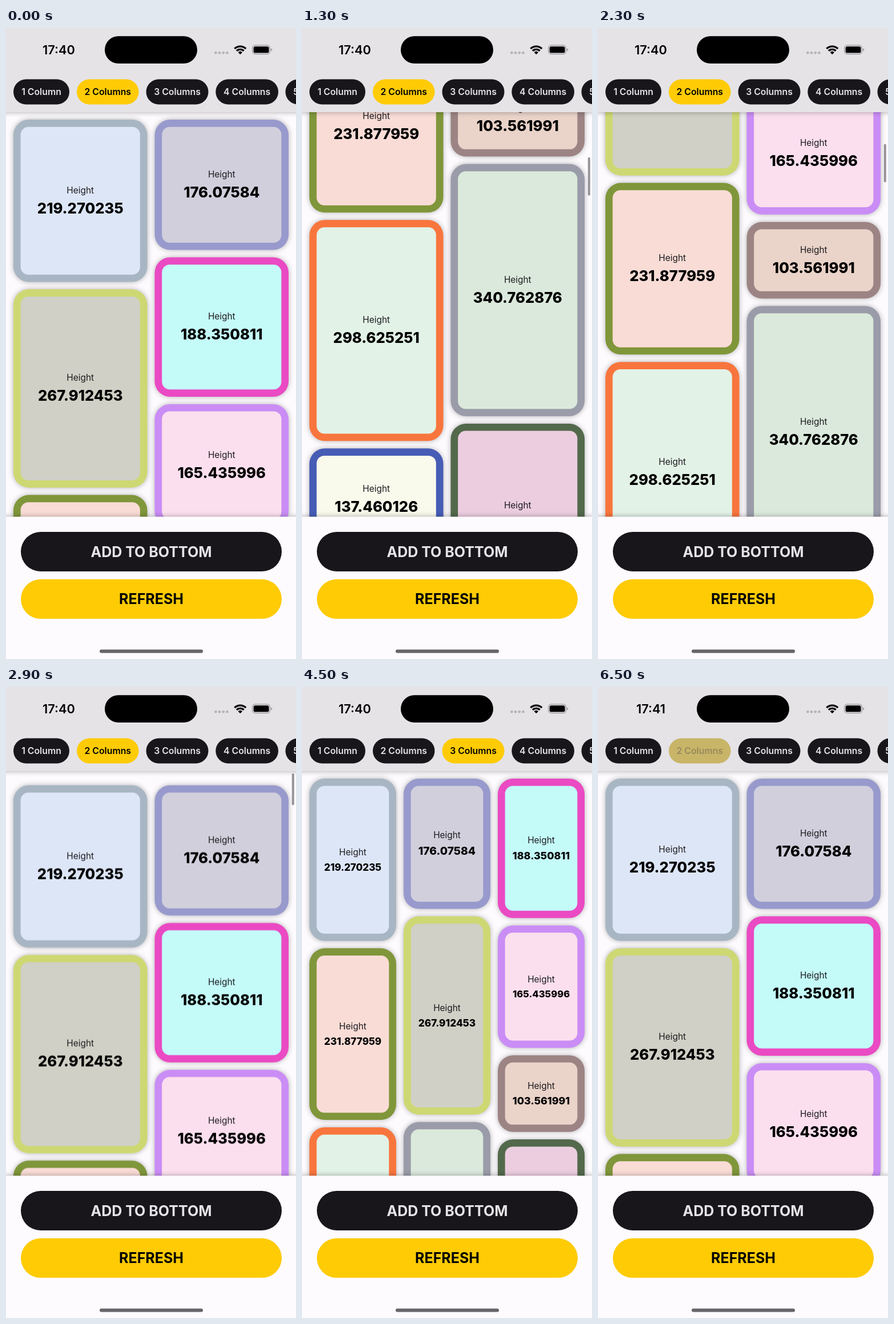
Animation of 508 by 1102 pixels, one loop 6600 ms. Source, as an HTML page:

```html
<!DOCTYPE html>
<html lang="en">
<head>
<meta charset="utf-8">
<title>Masonry grid</title>
<style>
  html, body { margin: 0; width: 100%; height: 100%; overflow: hidden; background: #fdfbfe; }
  svg { display: block; width: 100%; height: 100%; font-family: Inter, "Open Sans", sans-serif; }
  text { text-anchor: middle; }
  .label { font-size: 15.4px; fill: #1c1a1e; }
  .value { font-weight: 800; }
  .pill { font-size: 15.8px; font-weight: 600; }
  .action { font-size: 25px; font-weight: 700; }
  .clock { font-size: 21.8px; font-weight: 600; }
  #cards { filter: drop-shadow(0 0 5px rgba(0, 0, 0, .3)); }
  .bar { filter: drop-shadow(0 0 5px rgba(0, 0, 0, .33)); }
</style>
</head>
<body>
<svg id="stage" viewBox="0 0 508 1102">
  <rect width="508" height="1102" fill="#fdfbfe"/>
  <g id="cards"></g>
  <rect id="thumb" x="500.8" width="4" rx="2" fill="#97959a"/>

  <rect class="bar" x="-20" y="-20" width="548" height="167" fill="#e5e3e6"/>
  <text id="clock" class="clock" x="92.5" y="46"></text>
  <rect x="173" y="14.3" width="162" height="47.7" rx="23.8"/>
  <g fill="#b5b3b6">
    <circle cx="367.4" cy="43.3" r="2.4"/><circle cx="374" cy="43.3" r="2.4"/>
    <circle cx="380.7" cy="43.3" r="2.4"/><circle cx="387.4" cy="43.3" r="2.4"/>
  </g>
  <g fill="none" stroke="#000" stroke-width="3.2">
    <path d="M400.4 36.2A14 14 0 0 1 420.2 36.2"/>
    <path d="M404 40A8.8 8.8 0 0 1 416.6 40"/>
  </g>
  <path d="M410.3 46.2L406.6 42.4A5.2 5.2 0 0 1 414 42.4Z"/>
  <rect x="431.6" y="30.2" width="31" height="15.4" rx="5" fill="none" stroke="#98969a" stroke-width="1.2"/>
  <rect x="433.6" y="32.2" width="27" height="11.4" rx="3.2"/>
  <path d="M464.2 35.4Q466.4 36 466.4 37.9T464.2 40.4Z" fill="#98969a"/>
  <g id="pills"></g>

  <rect class="bar" x="-20" y="853.5" width="548" height="280" fill="#fdfbfe"/>
  <rect x="26" y="880" width="457" height="69" rx="34.5" fill="#18161a"/>
  <text class="action" x="254.5" y="923.6" fill="#e5e3e6">ADD TO BOTTOM</text>
  <rect x="26" y="962.8" width="457" height="69" rx="34.5" fill="#fecb05"/>
  <text class="action" x="254.5" y="1006.4">REFRESH</text>
  <rect x="164" y="1085.5" width="181" height="6" rx="3" fill="#67656a"/>
</svg>
<script>
const LOOP = 6600, STEP = 100;
const PT = 508 / 393, GAP = 10 * PT, TOP = 160, BORDER = 12.7;
const VALUE_SIZE = 25.6, LABEL_H = 18.5, TEXT_GAP = 6.7;
const DARK = [24, 22, 26], LIGHT = [229, 227, 230], YELLOW = [254, 203, 5], BLACK = [0, 0, 0];

// height, border, fill
const CARDS = [
  ['219.270235', '#a8b6c3', '#dde6f7'],
  ['176.07584', '#989acd', '#d1cfdc'],
  ['188.350811', '#ea4ac3', '#c4fbf9'],
  ['267.912453', '#ced873', '#d0d0c6'],
  ['165.435996', '#ca8df5', '#fcdfee'],
  ['231.877959', '#80963a', '#f9dcd6'],
  ['103.561991', '#9d8484', '#ead3c9'],
  ['340.762876', '#9a9ca9', '#dae9db'],
  ['298.625251', '#f8763d', '#e2f2e6'],
  ['249.396411', '#53694b', '#eccde0'],
  ['137.460126', '#465cb5', '#f9faec'],
  ['102.425657', '#4a6796', '#fccdcc'],
  ['109.703832', '#c99382', '#d5c5f1'],
  ['147.407637', '#6157be', '#cac9da'],
  ['206.318274', '#6634cb', '#c5c7c8'],
  ['182.604913', '#56c6dc', '#dfe8dc']
];

// left, width
const PILLS = [[13, 98], [124, 108.5], [245.5, 109], [367.3, 109.7], [489.5, 109]];

// press time, switch time, columns
const TAPS = [[3900, 4100, 3], [4700, 4800, 4], [5700, 5800, 1], [6400, 6500, 2]];

// time, offset, velocity per ms
const SCROLL = [
  [950, 0, 0], [1300, 793, 2], [1700, 1231, .5], [1850, 1262, 0],
  [2300, 545, -1.3], [2900, -11.6, 0], [3300, 0, 0]
];

const $ = id => document.getElementById(id);
const clamp = x => Math.min(1, Math.max(0, x));
const mix = (a, b, k) => `rgb(${a.map((v, i) => Math.round(v + (b[i] - v) * k))})`;

function set(el, attrs) {
  for (const key in attrs) el.setAttribute(key, attrs[key]);
  return el;
}

function add(parent, tag, attrs, text) {
  const el = document.createElementNS('http://www.w3.org/2000/svg', tag);
  if (text) el.textContent = text;
  return parent.appendChild(set(el, attrs));
}

const cards = CARDS.map(([height, border, fill]) => {
  const group = add($('cards'), 'g', {});
  const card = {
    group,
    h: height * PT,
    outer: add(group, 'rect', { rx: 27, fill: border }),
    inner: add(group, 'rect', { x: BORDER, y: BORDER, rx: 13.5, fill }),
    label: add(group, 'text', { class: 'label' }, 'Height'),
    value: add(group, 'text', { class: 'value', 'font-size': VALUE_SIZE }, height)
  };
  card.textWidth = card.value.getComputedTextLength();
  return card;
});

const pills = PILLS.map(([x, width], i) => {
  const group = add($('pills'), 'g', {});
  return {
    group,
    body: add(group, 'rect', { x, y: 89.5, width, height: 44, rx: 22 }),
    text: add(group, 'text', { class: 'pill', x: x + width / 2, y: 117.2 },
      `${i + 1} Column${i ? 's' : ''}`)
  };
});

// Each card goes to the shortest column; values shrink to fit.
function layout(cols) {
  const w = (508 - GAP * (cols + 1)) / cols;
  const ends = Array(cols).fill(TOP);
  for (const c of cards) {
    const col = ends.indexOf(Math.min(...ends));
    const size = VALUE_SIZE * Math.min(1, (w - 4 * GAP) / c.textWidth);
    const lineH = size * 1.2;
    const half = (LABEL_H + TEXT_GAP + lineH) / 2;
    const mid = c.h / 2;
    set(c.group, { transform: `translate(${GAP + col * (w + GAP)} ${ends[col]})` });
    set(c.outer, { width: w, height: c.h });
    set(c.inner, { width: w - 2 * BORDER, height: c.h - 2 * BORDER });
    set(c.label, { x: w / 2, y: mid - half + LABEL_H / 2 + 5.6 });
    set(c.value, { x: w / 2, y: mid + half - lineH / 2 + size * .364, 'font-size': size });
    ends[col] += c.h + GAP;
  }
}

function scrollAt(t) {
  const i = SCROLL.findIndex(key => key[0] > t);
  if (i < 1) return 0;
  const [t0, y0, v0] = SCROLL[i - 1], [t1, y1, v1] = SCROLL[i];
  const d = t1 - t0, u = (t - t0) / d, w = 1 - u;
  return y0 * (1 + 2 * u) * w * w + v0 * d * u * w * w
       + y1 * u * u * (3 - 2 * u) - v1 * d * u * u * w;
}

function drawPills(t, cols, since) {
  const tap = TAPS.find(([press, change]) => t >= press && t < change);
  const k = clamp((t - since) / 400);
  pills.forEach((p, i) => {
    const on = i + 1 === cols;
    set(p.body, { fill: on ? mix([200, 181, 104], YELLOW, k) : mix(DARK, DARK, 0) });
    set(p.text, { fill: on ? mix([151, 138, 92], BLACK, k) : mix(LIGHT, LIGHT, 0) });
    set(p.group, { opacity: tap && tap[2] === i + 1 ? .5 : 1 });
  });
}

let shownCols = 0;

function draw(t) {
  const last = TAPS.filter(tap => t >= tap[1]).pop();
  const cols = last ? last[2] : 2;
  if (cols !== shownCols) layout(shownCols = cols);

  const y = scrollAt(t);
  set($('cards'), { transform: `translate(0 ${-y})` });
  set($('thumb'), {
    y: 151 + Math.max(0, y) * .0943,
    height: 67 + Math.min(0, y),
    opacity: t < 950 ? 0 : clamp((3300 - t) / 300)
  });
  drawPills(t, cols, last ? last[1] : -LOOP);
  $('clock').textContent = t < 4800 ? '17:40' : '17:41';
}

const start = performance.now();
function tick() {
  const t = (performance.now() - start) % LOOP;
  draw(Math.floor(t / STEP) * STEP);
  requestAnimationFrame(tick);
}
tick();
</script>
</body>
</html>
```
